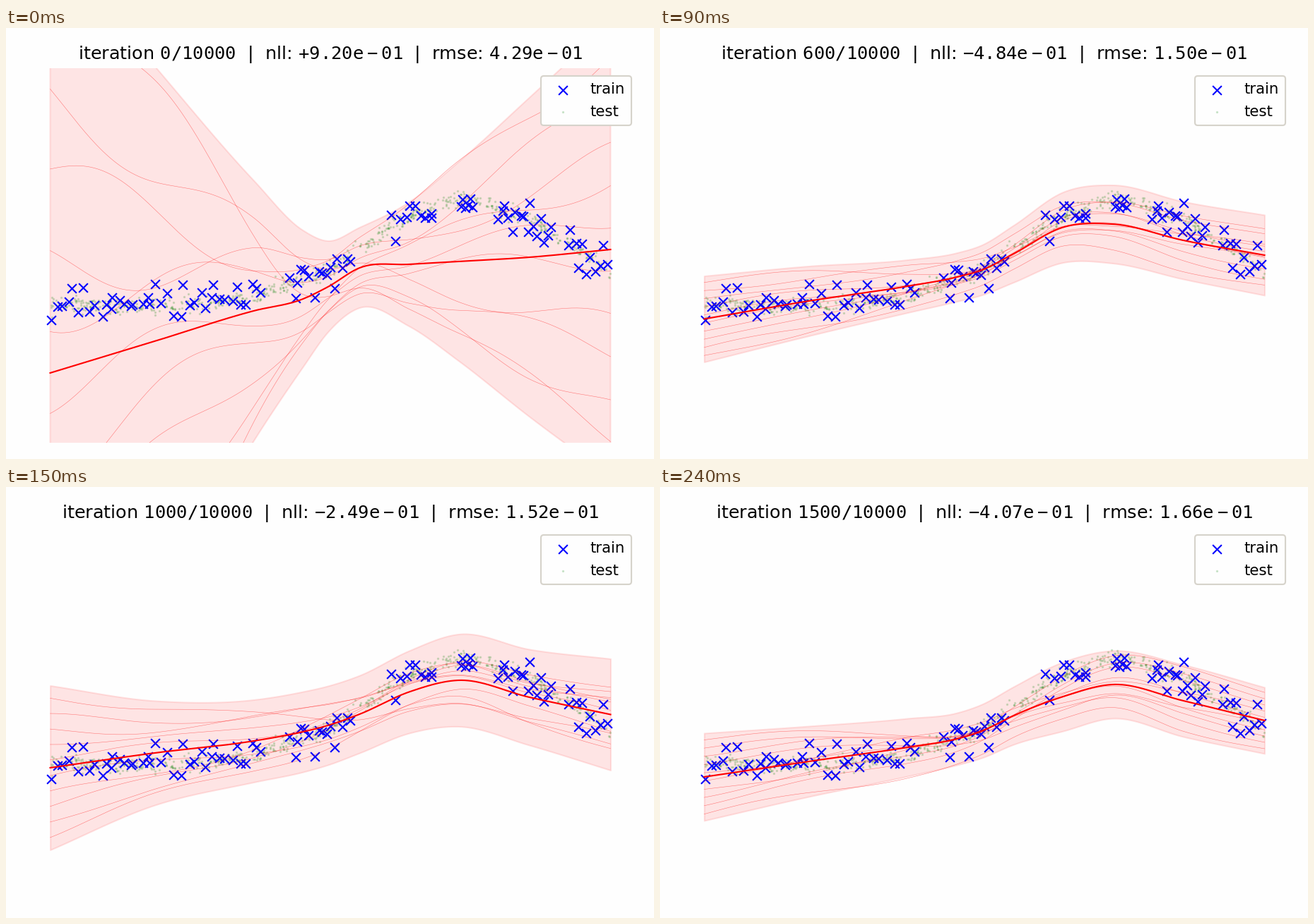
A matplotlib script for the animation above (1270 ms loop, 917 px wide and 611 px high).

```python
import numpy as np
import matplotlib.pyplot as plt
from matplotlib.animation import FuncAnimation

W, H, DPI = 917, 611, 152.8
LEFT, RIGHT, TOP, BOTTOM = 22, 895, 57, 588
TICK_MS, LOOP_MS, STEP_MS = 10, 1270, 30
ITERATIONS = [0, 200, 400, 600, 800, 1000, 1200, 1400, 1500]
START, END = 62, 855
GRID = np.linspace(START, END, 320)
KNOTS = np.array([START, 210, 350, 420, 455, 500, 570, 640, 740, END], float)
N_SAMPLES = 10

plt.rcParams["font.family"] = "DejaVu Sans"
rng = np.random.default_rng(3)


def smooth(values, x=GRID):
    """Cubic Hermite curve through values at the knots."""
    y = np.asarray(values, float)
    slope = np.gradient(y, KNOTS)
    i = np.clip(np.searchsorted(KNOTS, x) - 1, 0, len(KNOTS) - 2)
    h = KNOTS[i + 1] - KNOTS[i]
    t = (x - KNOTS[i]) / h
    return ((1 + 2 * t) * (1 - t) ** 2 * y[i] + t * (1 - t) ** 2 * h * slope[i]
            + t * t * (3 - 2 * t) * y[i + 1] + t * t * (t - 1) * h * slope[i + 1])


def sample_offsets():
    """Random functions in band units: spread at both ends, mixing in the middle."""
    left = np.linspace(-0.85, 0.85, N_SAMPLES)
    right = rng.permutation(left)
    phase = rng.uniform(0, 2 * np.pi, N_SAMPLES)
    u = (GRID - START) / (END - START)
    mix = 1 / (1 + np.exp(-12 * (u - 0.5)))
    wiggle = 0.25 * np.sin(np.pi * u) * np.sin(9 * u + phase[:, None])
    return left[:, None] * (1 - mix) + right[:, None] * mix + wiggle


fits = {}


def add_fit(iteration, nll, rmse, mean, half):
    """Store the scores, mean, band edges and sampled functions of one fit."""
    mean, half = smooth(mean), smooth(half)
    samples = mean + half * sample_offsets()
    fits[iteration] = (np.array([nll, rmse]),
                       np.array([mean, mean - half, mean + half, *samples]))


add_fit(0, 9.20e-1, 4.29e-1,
        mean=[489, 444, 401, 384, 367, 340, 335, 331, 325, 314],
        half=[611, 390, 185, 97, 65, 57, 88, 141, 226, 322])
add_fit(200, 3.93, 2.54e-1,
        mean=[422, 393, 371, 360, 351, 316, 308, 316, 320, 326],
        half=[46, 30, 18, 9, 13, 20, 23, 20, 18, 28])
add_fit(400, -5.18e-1, 1.56e-1,
        mean=[422, 394, 370, 357, 347, 317, 277, 283, 301, 317],
        half=[72, 53, 32, 24, 24, 27, 43, 48, 56, 64])
add_fit(800, -4.49e-1, 1.45e-1,
        mean=[403, 380, 362, 349, 339, 323, 288, 273, 301, 327],
        half=[50, 46, 43, 45, 47, 54, 57, 63, 54, 50])
add_fit(1200, -4.90e-2, 1.59e-1,
        mean=[393, 374, 358, 345, 337, 321, 293, 275, 295, 318],
        half=[183, 102, 74, 69, 65, 56, 60, 68, 82, 108])
add_fit(1500, -4.07e-1, 1.66e-1,
        mean=[411, 389, 369, 357, 346, 324, 297, 280, 303, 331],
        half=[62, 50, 41, 37, 38, 41, 49, 48, 51, 47])


def fit_at(iteration):
    """Scores and curves, blended between the stored fits."""
    lo = max(k for k in fits if k <= iteration)
    hi = min(k for k in fits if k >= iteration)
    t = (iteration - lo) / (hi - lo) if hi > lo else 0
    return [(1 - t) * a + t * b for a, b in zip(fits[lo], fits[hi])]


def noisy(x, sigma):
    truth = [391, 393, 379, 355, 342, 313, 266, 243, 273, 346]
    return smooth(truth, x) + rng.normal(0, sigma, len(x))


# Training points come in clusters: start, end, count
clusters = [(64, 362, 41), (400, 488, 16), (545, 605, 10),
            (643, 659, 6), (695, 771, 16), (793, 850, 11)]
train_x = np.concatenate([np.linspace(a, b, n) + rng.normal(0, 0.3 * (b - a) / n, n)
                          for a, b, n in clusters])
train_y = noisy(train_x, 14)
test_x = rng.uniform(START, END, 700)
test_y = noisy(test_x, 6)

fig = plt.figure(figsize=(W / DPI, H / DPI), dpi=DPI, facecolor="#fefefe")
ax = fig.add_axes([(LEFT + 0.5) / W, 1 - BOTTOM / H,
                   (RIGHT - LEFT) / W, (BOTTOM - TOP) / H])
ax.set(xlim=(LEFT, RIGHT), ylim=(BOTTOM, TOP))
ax.axis("off")

band = ax.fill_between(GRID, GRID, GRID, color="r", alpha=0.1)
ax.scatter(train_x, train_y, s=36, marker="x", color="b", lw=1, label="train", zorder=1.2)
ax.scatter(test_x, test_y, s=1.5, marker=".", color="g", lw=1, alpha=0.18,
           label="test", zorder=1.1)
sample_lines = [ax.plot([], [], "r", lw=0.25, alpha=0.5)[0] for _ in range(N_SAMPLES)]
mean_line, = ax.plot([], [], "r", lw=1)
ax.legend(loc="upper right", borderpad=0.45, labelspacing=0.55,
          framealpha=1, facecolor="#fefefe", edgecolor="#d6d3cb")
title = ax.set_title("")


def mono(text):
    return r"$\mathtt{%s}$" % text


def update(frame):
    step = min(frame * TICK_MS // STEP_MS, len(ITERATIONS) - 1)
    iteration = ITERATIONS[step]
    (nll, rmse), (mean, upper, lower, *samples) = fit_at(iteration)
    band.set_verts([np.r_[np.c_[GRID, upper], np.c_[GRID, lower][::-1]]])
    mean_line.set_data(GRID, mean)
    for line, y in zip(sample_lines, samples):
        line.set_data(GRID, y)
    title.set_text(f"iteration {mono(f'{iteration}/10000')}  |  "
                   f"nll: {mono(f'{nll:+.2e}')}  |  rmse: {mono(f'{rmse:.2e}')}")
    return [band, mean_line, title, *sample_lines]


anim = FuncAnimation(fig, update, frames=LOOP_MS // TICK_MS, interval=TICK_MS,
                     repeat=True, repeat_delay=0, blit=False)
plt.show()
```
